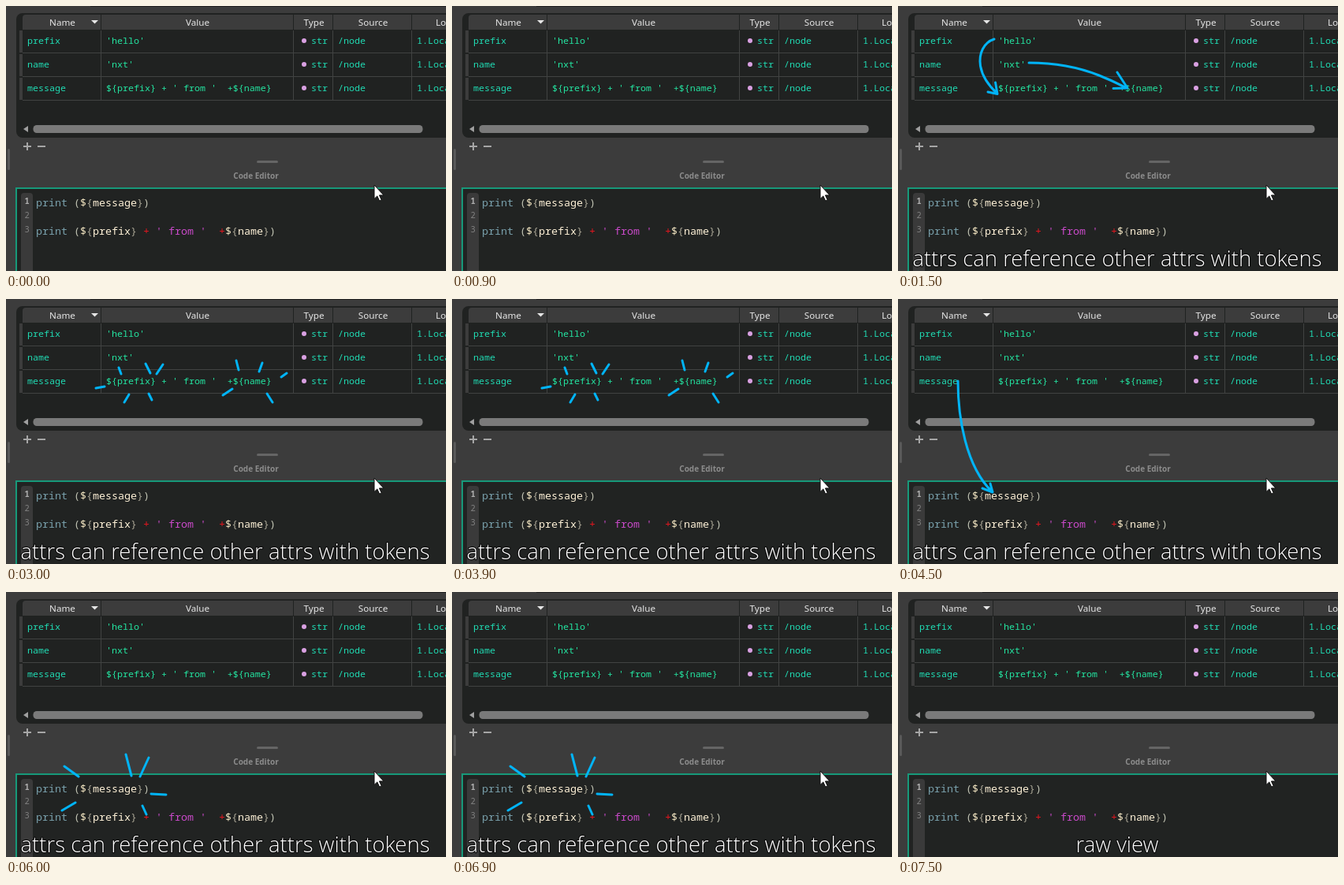
An HTML page that plays this animation: 558x336 px, repeating every 8000 ms.

```html
<!DOCTYPE html>
<html lang="en">
<head>
<meta charset="utf-8">
<title>Attribute tokens</title>
<style>
  html, body { margin: 0; width: 100%; height: 100%; overflow: hidden; background: #3c3c3c; }
  svg { display: block; }
  text { white-space: pre; }
  .mono { font: 500 11.67px "Noto Sans Mono", monospace; }
  .code { font-size: 13.33px; fill: #c2c4b4; }
  .lines { font-size: 10.5px; fill: #808080; }
  .head { font: 11.67px "Noto Sans", "Open Sans", sans-serif; fill: #e6e6e6; text-anchor: middle; }
  .title { font: bold 10px "Open Sans", "Noto Sans", sans-serif; fill: #8c8c8c; text-anchor: middle; }
  .caption { font: 300 27.5px "Open Sans", sans-serif; fill: #fff; text-anchor: middle;
    stroke: #111; stroke-width: 2.5px; stroke-linejoin: round; paint-order: stroke; }
  .ink { fill: none; stroke: #00b4f8; stroke-width: 3; stroke-linecap: round; stroke-linejoin: round; }
  .call { fill: #79a0ac; }
  .sigil { fill: #f6e8c4; }
  .brace { fill: #a8a494; }
  .token { fill: #fff2d8; }
  .op { fill: #e8161f; }
  .string { fill: #ca4aca; }
</style>
</head>
<body>
<svg width="558" height="336" viewBox="0 0 558 336">
  <rect width="558" height="336" fill="#3c3c3c"/>
  <path d="M107 0H558V1H107z" fill="#222"/>

  <!-- attribute table -->
  <rect x="13" y="9" width="570" height="158" rx="8" fill="#202221"/>
  <path d="M21 30V15q0-4 4-4H558V30z" fill="#3c3c3c"/>
  <path d="M17 31h4v28h-4zM17 61h4v28h-4zM17 91h4v28h-4z" fill="#3c3c3c"/>
  <path d="M120.5 11V30M364.5 11V30M414.5 11V30M514.5 11V30" stroke="#202221"/>
  <path d="M21 59.5H558M21 89.5H558M21 119.5H558M120.5 31V119M364.5 31V119M414.5 31V119M514.5 31V119" stroke="#414342"/>
  <path d="M108 18h9l-4.5 4.5z" fill="#e6e6e6"/>
  <g class="head">
    <text x="71.5" y="25">Name</text>
    <text x="243" y="25">Value</text>
    <text x="390.5" y="25">Type</text>
    <text x="465.5" y="25">Source</text>
    <text x="545" y="25" style="text-anchor:start">Location</text>
  </g>
  <g id="rows" class="mono"></g>
  <rect x="34.5" y="151" width="494" height="10" rx="4.5" fill="#7a7a7a"/>
  <path d="M28 152v8l-6-4z" fill="#a0a0a0"/>

  <!-- table buttons and splitters -->
  <path d="M22 178H32M27 173V183M40 178H50" stroke="#a6a6a6" stroke-width="2"/>
  <rect x="2" y="181" width="3" height="27" rx="1.5" fill="#595959"/>
  <rect x="318" y="196" width="27" height="3" rx="1.5" fill="#656565"/>
  <text class="title" x="317" y="219">Code Editor</text>

  <!-- code editor -->
  <rect x="13" y="231" width="560" height="120" fill="#212322" stroke="#17997a" stroke-width="2"/>
  <path d="M19 336V241q0-4 4-4h7q4 0 4 4V336z" fill="#3a3a3a"/>
  <g class="mono lines">
    <text x="23.5" y="251" font-weight="bold" fill="#acacac">1</text>
    <text x="23.5" y="269">2</text>
    <text x="23.5" y="287">3</text>
  </g>
  <g id="code" class="mono code"></g>

  <g id="overlays"></g>
  <path d="M467 227V244.5l3.8-3.6 2.8 6.2 2.6-1.2-2.8-6H479z" fill="#fff" stroke="#111"/>
</svg>
<script>
const byId = id => document.getElementById(id);

const attributes = [
  ["prefix", "'hello'"],
  ["name", "'nxt'"],
  ["message", "${prefix} + ' from '  +${name}"],
];
byId("rows").innerHTML = attributes.map(([name, value], i) => {
  const y = 48 + 30 * i;
  const cell = (x, text, color = "#20dcb4") => `<text x="${x}" y="${y}" fill="${color}">${text}</text>`;
  return cell(27, name) + cell(127, value, "#24e6a2") + cell(387, "str") + cell(421, "/node") +
    cell(521, "1.Local") + `<circle cx="378" cy="${y - 4}" r="3" fill="#d9a0e2"/>`;
}).join("");

const span = (kind, text) => `<tspan class="${kind}">${text}</tspan>`;
const token = name => span("sigil", "$") + span("brace", "{") + span("token", name) + span("brace", "}");
const printLine = (y, body) => `<text x="38" y="${y}">${span("call", "print")} (${body})</text>`;
byId("code").innerHTML =
  printLine(254, token("message")) +
  printLine(290, `${token("prefix")} ${span("op", "+")} ${span("string", "' from '")}  ${span("op", "+")}${token("name")}`);

const ink = d => `<path class="ink" d="${d}"/>`;
const caption = text => `<text class="caption" x="278" y="330">${text}</text>`;
const tokens = caption("attrs can reference other attrs with tokens");

const scenes = [
  "",
  tokens +
    ink("M122 42C109 46 102 60 104.5 76C107 90 116 102 126 111M114 109L126 111.5L123.5 97") +
    ink("M166 72C205 72 235 80 255 88S280 99 290 104M278 84L291 104L273 104.5"),
  tokens +
    ink("M143 87L146 95M177 82L183 94M199 83L191 95M114 113L125 111M156 121L150 131M181 120L185 128") +
    ink("M292 78L295 90M325 81L321 92M356 94L349 99M287 114L275 122M331 120L338 131"),
  tokens + ink("M76 104C76 150 86 212 119 244M107 240L120 245L117 234"),
  tokens + ink("M74 221L92 234M152 206L159 233M181 210L170 234M184 256L203 257M88 267L71 277M173 271L178 282"),
  caption("raw view"),
];
byId("overlays").innerHTML = scenes.map(scene => `<g>${scene}</g>`).join("");
const layers = [...byId("overlays").children];

const LOOP = 8000, HOLD = 1500;
const start = performance.now();
function draw(now) {
  const time = Math.max(0, now - start) % LOOP;
  const current = Math.floor(time / HOLD);
  layers.forEach((layer, i) => layer.setAttribute("display", i === current ? "inline" : "none"));
  requestAnimationFrame(draw);
}
draw(start);
</script>
</body>
</html>
```
